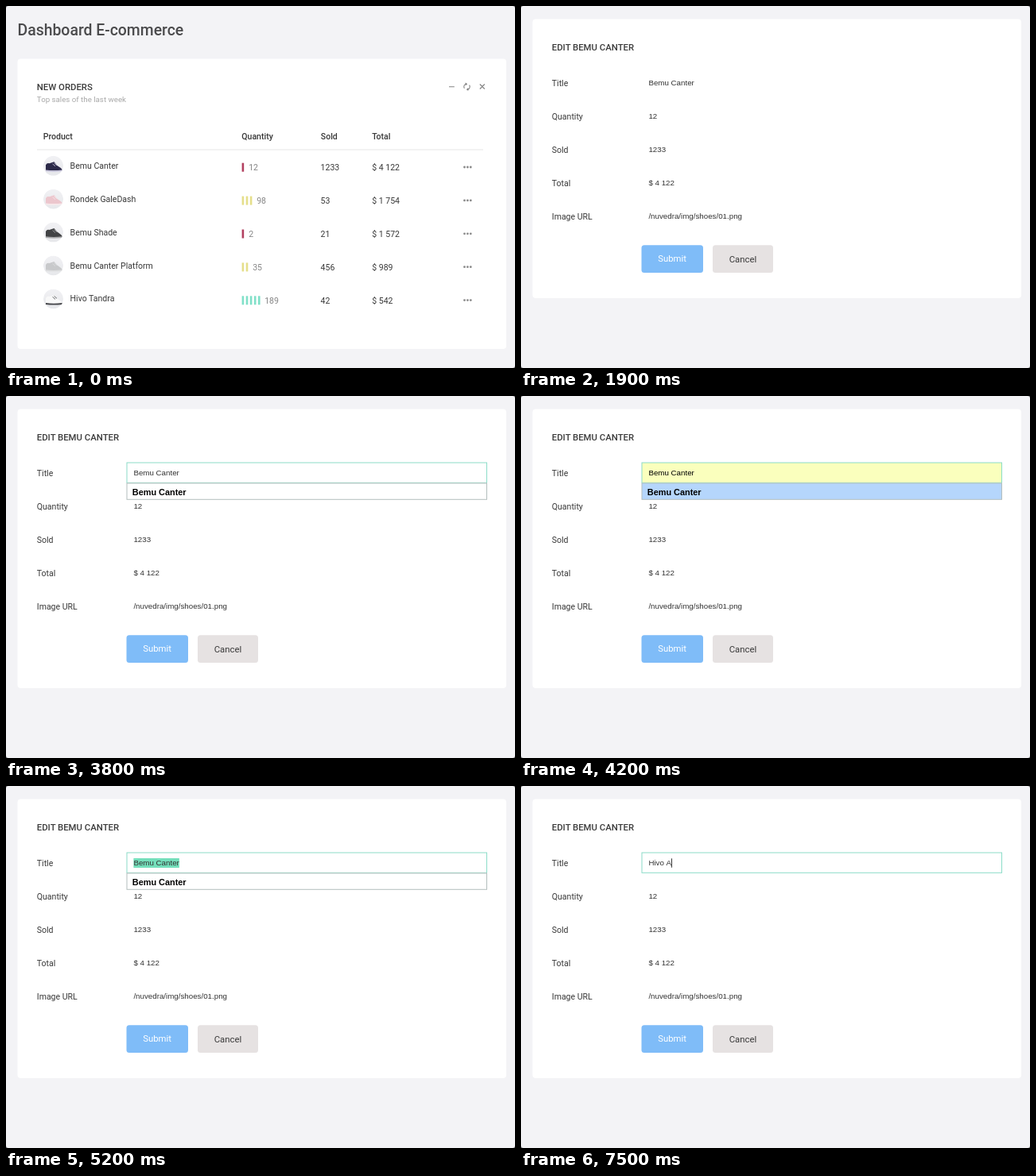
An HTML page that plays this animation: 640x456 px, repeating every 8000 ms.

```html
<!DOCTYPE html>
<html lang="en">
<head>
<meta charset="utf-8">
<title>Dashboard</title>
<style>
  html, body { margin: 0; width: 100%; height: 100%; overflow: hidden; background: #5a5a5c; }
  svg { display: block; width: 640px; height: 456px; }
  text { font: 10.54px Roboto, sans-serif; fill: #383838; white-space: pre; }
  .h1 { font-size: 19.4px; font-weight: 500; fill: #4b4b4d; }
  .h2 { font-size: 11.35px; font-weight: 500; fill: #3c3c3c; }
  .sub { font-size: 9.73px; fill: #a9a9a9; }
  .th { font-weight: 500; }
  .qty { fill: #868686; }
  .big { font-size: 11.35px; }
  .light { fill: #fff; }
  .input { font: 9.75px "Liberation Sans", Arial, sans-serif; fill: #333; }
  .dark { fill: #000; }
  .bold { font: bold 10.9px "Liberation Sans", Arial, sans-serif; fill: #000; }
  .icon { fill: none; stroke: #828282; stroke-width: 1.1; }
  #menu rect { filter: drop-shadow(0 1px 2px rgba(86, 96, 117, .3)); }
</style>
</head>
<body>
<svg viewBox="0 0 640 456">
  <defs>
    <linearGradient id="photo" x2="0" y2="1">
      <stop stop-color="#f1f1f4"/><stop offset="1" stop-color="#e7e8eb"/>
    </linearGradient>
    <clipPath id="round"><circle r="12.5"/></clipPath>
  </defs>
  <rect width="640" height="456" rx="3" fill="#f3f3f6"/>

  <g id="list">
    <text class="h1" x="14.5" y="37.2">Dashboard E-commerce</text>
    <rect x="14.5" y="66.5" width="614.5" height="365.5" rx="4" fill="#fff"/>
    <text class="h2" x="38.8" y="106.4">NEW ORDERS</text>
    <text class="sub" x="38.8" y="120.9">Top sales of the last week</text>
    <g class="icon">
      <path d="M557 101.7h6.8M595.8 98.5l6 6M601.8 98.5l-6 6"/>
      <path d="M578.4 98.2a3.6 3.6 0 0 0-2 5.5M580.6 105.1a3.6 3.6 0 0 0 2-5.5M577.6 97l1.7 1.2-1.5 1.4M581.4 106.3l-1.7-1.2 1.5-1.4"/>
    </g>
    <path d="M39 181h561" stroke="#e6e6e6"/>
    <g id="rows"></g>
  </g>

  <g id="menu">
    <rect x="523.5" y="210.5" width="74.5" height="74" rx="3" fill="#fff"/>
    <text class="big" x="543.3" y="239.4">Edit</text>
    <text class="big" x="543.3" y="263.5">Delete</text>
  </g>

  <g id="form">
    <rect x="14.5" y="16.5" width="614.5" height="351.5" rx="4" fill="#fff"/>
    <text class="h2" x="38.8" y="56.4">EDIT BEMU CANTER</text>
    <g id="fields"></g>
    <rect x="151.5" y="301.3" width="77.5" height="34.7" rx="3.5" fill="#7fbcf8"/>
    <text class="big light" x="172.2" y="322.4">Submit</text>
    <rect x="241" y="301.3" width="76" height="34.7" rx="3.5" fill="#e6e2e2"/>
    <text class="big" x="261.7" y="323.2">Cancel</text>
    <rect id="box" x="152" y="84" width="452.5" height="25.3" fill="#fff"/>
    <g id="drop">
      <rect id="option" x="152" y="109.9" width="452.5" height="20.4" fill="#fff" stroke="#b3bebd"/>
      <text class="bold" x="158.8" y="124.7">Bemu Canter</text>
    </g>
    <g id="title"></g>
  </g>
</svg>
<script>
const LOOP = 8000, LEFT = 160.4, BASE = 100.1;
const $ = id => document.getElementById(id);

function add(parent, tag, attrs, content) {
  const el = document.createElementNS('http://www.w3.org/2000/svg', tag);
  for (const k in attrs) el.setAttribute(k, attrs[k]);
  if (content) el.textContent = content;
  return parent.appendChild(el);
}

// steps: [ms, value] pairs, each value held until the next
function track(el, prop, steps) {
  const frames = steps.map(([t, v]) => ({ offset: t / LOOP, [prop]: v, easing: 'step-end' }));
  frames.push({ offset: 1, [prop]: steps[steps.length - 1][1] });
  el.animate(frames, { duration: LOOP, iterations: Infinity });
}

function show(el, ...spans) {
  const steps = spans[0][0] > 0 ? [[0, 0]] : [];
  for (const [from, to] of spans) {
    steps.push([from, 1]);
    if (to < LOOP) steps.push([to, 0]);
  }
  track(el, 'opacity', steps);
}

// Order table
const rows = $('rows');
[['Product', 46.8], ['Quantity', 296.3], ['Sold', 395.8], ['Total', 460.2]]
  .forEach(([s, x]) => add(rows, 'text', { class: 'th', x, y: 168.3 }, s));

const RED = '#b2405f', YELLOW = '#e5df8b', TEAL = '#80e0c8';
const orders = [
  ['Bemu Canter', 1, RED, '12', '1233', '$ 4 122', '#2b2948', '#c9c6dc'],
  ['Rondek GaleDash', 3, YELLOW, '98', '53', '$ 1 754', '#ecc6cd', '#f7e8ea'],
  ['Bemu Shade', 1, RED, '2', '21', '$ 1 572', '#424345', '#a9a9ab'],
  ['Bemu Canter Platform', 2, YELLOW, '35', '456', '$ 989', '#c8c9cb', '#dedfe0'],
  ['Hivo Tandra', 5, TEAL, '189', '42', '$ 542', '#f8f8f8', '#45464a']
];

function shoe(x, y, body, sole) {
  const g = add(rows, 'g', { transform: `translate(${x} ${y})`, 'clip-path': 'url(#round)' });
  add(g, 'circle', { r: 12.5, fill: 'url(#photo)' });
  add(g, 'path', { d: 'M-9.5 5V-1Q-8-4-5-3L1-5Q4 0 9 2.5Q11.5 4 11 6H-9.5Z', fill: body });
  add(g, 'path', { d: 'M-9.5 5.2Q0 6.6 11.3 5.2V7Q0 8.2-9.5 7Z', fill: sole });
  add(g, 'path', { d: 'M-1-2.5L2.5.5M1-3.5L4.5-.5', stroke: sole, 'stroke-width': .8 });
}

orders.forEach(([name, bars, tint, qty, sold, total, body, sole], i) => {
  const y = 203 + i * 41.9;
  shoe(59.5, y - 1.7, body, sole);
  add(rows, 'text', { x: 80.6, y: y + 1.8 }, name);
  for (let b = 0; b < bars; b++)
    add(rows, 'rect', { x: 296.6 + b * 5.1, y: y - 5.3, width: 2.6, height: 11, fill: tint });
  add(rows, 'text', { class: 'qty', x: 300.2 + bars * 5, y: y + 3.9 }, qty);
  add(rows, 'text', { x: 395.6, y: y + 3.9 }, sold);
  add(rows, 'text', { x: 460.2, y: y + 3.9 }, total);
  const dots = add(rows, 'g', { fill: '#8b8b8b' });
  for (let d = 0; d < 3; d++)
    add(dots, 'circle', { cx: 576.5 + d * 3.9, cy: y, r: 1.4 });
  if (!i) track(dots, 'fill', [[0, '#8b8b8b'], [1100, '#86b8ab'], [1200, '#70dfc4']]);
});

// Edit form
[['Title', ''], ['Quantity', '12'], ['Sold', '1233'], ['Total', '$ 4 122'],
 ['Image URL', '/nuvedra/img/shoes/01.png']].forEach(([label, value], i) => {
  const y = BASE + i * 42;
  add($('fields'), 'text', { x: 38.8, y: y + .8 }, label);
  if (value) add($('fields'), 'text', { class: 'input', x: LEFT, y }, value);
});

const title = $('title');
function typed(s, cls = '') {
  return add(title, 'text', { class: 'input ' + cls, x: LEFT, y: BASE }, s);
}
function caret(x, ...spans) {
  show(add(title, 'rect', { x, y: 91.3, width: .9, height: 11.4, fill: '#222' }), ...spans);
}

const name = typed('Bemu Canter');
const width = name.getComputedTextLength();
const head = name.getSubStringLength(0, 5);
show(name, [1900, 4200], [4300, 5600]);
show(typed('Bemu Canter', 'dark'), [4200, 4300]);
caret(LEFT, [3300, 3800], [4300, 4600]);

// Selection: last word, then everything
function select(x, w, s, from, to) {
  const g = add(title, 'g', {});
  add(g, 'rect', { x, y: 91, width: w, height: 12, fill: '#74dfbb' });
  add(g, 'text', { class: 'input light', x, y: BASE }, s);
  show(g, [from, to]);
}
select(LEFT + head, width - head, 'Canter', 4600, 4700);
select(LEFT, width, 'Bemu Canter', 4700, 5600);

const keys = [[5600, 'H'], [6700, 'Hi'], [6800, 'Hiv'], [6900, 'Hivo'], [7100, 'Hivo\u00a0'], [7500, 'Hivo\u00a0A']];
keys.forEach(([t, s], i) => {
  const end = i + 1 < keys.length ? keys[i + 1][0] : LOOP;
  const el = typed(s);
  const blinks = [];
  for (let on = t; on < end; on += 1000) blinks.push([on, Math.min(on + 500, end)]);
  caret(LEFT + el.getComputedTextLength(), ...blinks);
  show(el, [t, end]);
});

// Scenes and states
show($('list'), [0, 1900]);
show($('menu'), [1800, 1900]);
show($('form'), [1900, LOOP]);
show($('drop'), [3300, 5600]);
track($('box'), 'stroke', [[0, '#fff'], [3300, '#ededed'], [3400, '#b4e3d7'], [3500, '#8bdcc8']]);
track($('box'), 'fill', [[0, '#fff'], [4200, '#faffbd'], [4300, '#fff']]);
track($('option'), 'fill', [[0, '#fff'], [4200, '#b5d6fc'], [4300, '#fff']]);
</script>
</body>
</html>
```
